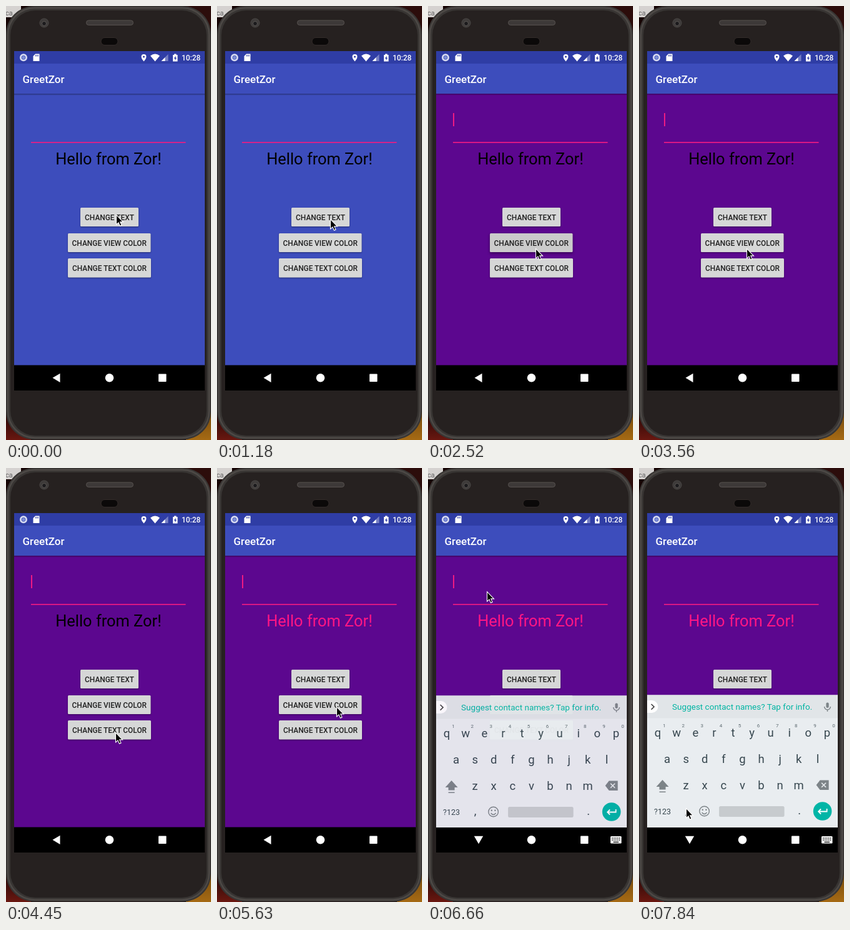
An HTML page that plays this animation: 328 by 693 pixels, repeating every 7.99 s.

```html
<!DOCTYPE html>
<html lang="en">
<head>
<meta charset="utf-8">
<title>Phone demo</title>
<style>
html, body { margin: 0; width: 100%; height: 100%; overflow: hidden; background: #160504; }
svg { display: block; width: 328px; height: 693px; font-family: Roboto, sans-serif; }
.anim { animation: 7.99s step-end infinite; }
.btn { fill: #d6d7d7; filter: drop-shadow(0 1px 1px rgba(0,0,0,.4)); }
.label { font-size: 11.9px; font-weight: 500; fill: #212121; text-anchor: middle; }
.accent { fill: #ee1b83; }
.key { font-size: 18.5px; fill: #37474f; text-anchor: middle; }
.digit { font-size: 8px; fill: #5d6a70; text-anchor: middle; }

#view { fill: #3d4dbc; animation-name: view; }
#hello { font-size: 25.4px; fill: #000; animation-name: hello; }
#caret { opacity: 0; animation-name: caret; }
#b0 { animation-name: press0; }
#b1 { animation-name: press1; }
#b2 { animation-name: press2; }
#keyboard { opacity: 0; animation-name: slide; }
#back { animation-name: back; }
#down { opacity: 0; animation-name: down; }
#pointer { animation-name: pointer; }

@keyframes view { 0% { fill: #3d4dbc } 31.53%, 100% { fill: #5c078f } }
@keyframes hello { 0% { fill: #000 } 59.32%, 100% { fill: #ff1684 } }
@keyframes caret {
  0%, 11.13%, 24.03%, 35.29%, 48.18%, 61.2%, 74.09%, 85.23%, 98.12%, 100% { opacity: 0 }
  3.75%, 16.64%, 29.66%, 40.8%, 53.81%, 66.7%, 79.72%, 90.86% { opacity: 1 }
}
@keyframes press0 {
  3.75% { filter: drop-shadow(0 2px 2px rgba(0,0,0,.5)) }
  5.63% { fill: #cbcbcb; filter: drop-shadow(0 2px 2px rgba(0,0,0,.5)) }
  9.26%, 100% { fill: #d6d7d7; filter: drop-shadow(0 1px 1px rgba(0,0,0,.4)) }
}
@keyframes press1 {
  27.78% { fill: #d6d7d7; filter: drop-shadow(0 2px 2px rgba(0,0,0,.5)) }
  31.53% { fill: #cbcbcb; filter: drop-shadow(0 2px 2px rgba(0,0,0,.4)) }
  35.29%, 100% { fill: #d6d7d7; filter: drop-shadow(0 1px 1px rgba(0,0,0,.4)) }
}
@keyframes press2 {
  57.57% { fill: #d6d7d7; filter: drop-shadow(0 2px 2px rgba(0,0,0,.5)) }
  59.32% { fill: #cbcbcb; filter: drop-shadow(0 2px 2px rgba(0,0,0,.4)) }
  63.07%, 100% { fill: #d6d7d7; filter: drop-shadow(0 1px 1px rgba(0,0,0,.4)) }
}
@keyframes slide {
  0% { opacity: 0 }
  81.47% { opacity: .4; transform: translateY(14px) }
  83.35% { opacity: .965; transform: translateY(1px) }
  85.23%, 100% { opacity: 1; transform: none }
}
@keyframes back { 0% { opacity: 1 } 81.47%, 100% { opacity: 0 } }
@keyframes down { 0% { opacity: 0 } 81.47%, 100% { opacity: 1 } }
@keyframes pointer {
  0% { transform: translate(177px, 334px) }
  14.76% { transform: translate(182px, 341px) }
  16.64% { transform: translate(194px, 362px) }
  18.52% { transform: translate(198px, 388px) }
  20.4% { transform: translate(184px, 403px) }
  22.27% { transform: translate(175px, 394px) }
  24.03% { transform: translate(173px, 388px) }
  46.3% { transform: translate(172px, 392px) }
  48.18% { transform: translate(172px, 399px) }
  50.06% { transform: translate(171px, 407px) }
  51.93% { transform: translate(171px, 412px) }
  53.81% { transform: translate(172px, 415px) }
  55.69% { transform: translate(176px, 423px) }
  66.7% { transform: translate(178px, 420px) }
  68.58% { transform: translate(184px, 405px) }
  70.46% { transform: translate(192px, 382px) }
  72.21% { transform: translate(208px, 328px) }
  74.09% { transform: translate(182px, 264px) }
  75.96% { transform: translate(136px, 220px) }
  77.84% { transform: translate(105px, 203px) }
  79.72% { transform: translate(95px, 198px) }
  90.86% { transform: translate(94px, 218px) }
  92.74% { transform: translate(89px, 310px) }
  94.49% { transform: translate(82px, 440px) }
  96.37% { transform: translate(77px, 528px) }
  98.12%, 100% { transform: translate(76px, 544px) }
}
</style>
</head>
<body>
<svg viewBox="0 0 328 693">
  <defs>
    <linearGradient id="shade" x2="0" y2="1">
      <stop stop-color="#000" stop-opacity=".35"/><stop offset="1" stop-color="#000" stop-opacity="0"/>
    </linearGradient>
    <linearGradient id="red" x2="0" y2="1">
      <stop stop-color="#160504"/><stop offset="1" stop-color="#6a1710"/>
    </linearGradient>
    <linearGradient id="amber" x2="0" y2="1">
      <stop stop-color="#6d450c"/><stop offset="1" stop-color="#a66a14"/>
    </linearGradient>
    <clipPath id="app"><rect x="13" y="140" width="305" height="433.5"/></clipPath>
  </defs>

  <!-- desktop -->
  <path d="M0 0H24V18H0Z" fill="#d5d2d0"/>
  <text x="-1" y="15" font-size="11" fill="#666">ca</text>
  <path d="M288 0H328V40H288Z" fill="#2c0d0b"/>
  <path d="M0 640H40V693H0Z" fill="url(#red)"/>
  <path d="M288 640H328V693H288Z" fill="url(#amber)"/>

  <!-- phone body -->
  <rect x="0" y="0" width="328" height="692.5" rx="45" fill="#383533"/>
  <rect x="3" y="3" width="322" height="686.5" rx="43" fill="none" stroke="#4d4946" stroke-width="2.5"/>
  <rect x="7" y="7" width="314" height="679" rx="40" fill="#262120"/>
  <circle cx="61" cy="27" r="7" fill="#3d3a39" stroke="#4b4846"/>
  <circle cx="61" cy="28" r="3.5" fill="#1b1a1c" stroke="#5c5856"/>
  <rect x="128.5" y="23" width="75" height="7.5" rx="3.7" fill="#3d3938" stroke="#57524f"/>
  <rect x="152" y="50.5" width="27" height="12" rx="6" fill="#0b0909" stroke="#332c2a"/>

  <!-- app -->
  <rect x="13" y="72" width="305" height="542"/>
  <rect id="view" class="anim" x="13" y="140" width="305" height="433.5"/>
  <rect x="13" y="72" width="305" height="68" fill="#3d4dbc"/>
  <rect x="13" y="72" width="305" height="20" fill="#2f3da5"/>
  <rect x="13" y="140" width="305" height="3" fill="url(#shade)"/>
  <text x="26.5" y="123" font-size="17" font-weight="500" fill="#fff">GreetZor</text>

  <!-- status bar -->
  <g fill="#fff">
    <circle cx="28" cy="82.3" r="6" fill="#d9dcf1"/>
    <circle cx="28" cy="82.3" r="3" fill="#8090d8" stroke="#5061bd"/>
    <path d="M47 76.5H53.5V88H43.5V80Z"/>
    <path d="M47.3 78V80.5M49.3 78V80.5M51.3 78V80.5" stroke="#2f3da5"/>
    <path d="M220.5 77a4 4 0 0 1 4 4q0 3-4 7.5q-4-4.5-4-7.5a4 4 0 0 1 4-4Z"/>
    <circle cx="220.5" cy="81" r="1.5" fill="#2f3da5"/>
    <path d="M231 79.5Q238.5 73.5 246 79.5L238.5 88.5Z"/>
    <path d="M259.5 77V88H248.5Z" opacity=".35"/>
    <path d="M254.5 82V88H248.5Z"/>
    <path d="M269 76.5H272.5V78H274.5V88.5H267V78H269Z"/>
    <path d="M271.5 79.5L268.8 84H270.5V87L273 82.8H271.5Z" fill="#2f3da5"/>
    <text x="281" y="86.7" font-size="11.9" font-weight="500">10:28</text>
  </g>

  <!-- content -->
  <rect class="accent" x="40" y="217" width="247.5" height="1.7"/>
  <rect id="caret" class="accent anim" x="40" y="171" width="2" height="21"/>
  <text id="hello" class="anim" x="79.2" y="252.7">Hello from Zor!</text>
  <rect id="b0" class="btn anim" x="119" y="322" width="93" height="30" rx="1.5"/>
  <rect id="b1" class="btn anim" x="99" y="363" width="132.5" height="30" rx="1.5"/>
  <rect id="b2" class="btn anim" x="99" y="403" width="133" height="30.5" rx="1.5"/>
  <text class="label" x="165.5" y="341.7">CHANGE TEXT</text>
  <text class="label" x="165.3" y="382.8">CHANGE VIEW COLOR</text>
  <text class="label" x="165.5" y="422.9">CHANGE TEXT COLOR</text>

  <!-- keyboard -->
  <g clip-path="url(#app)">
    <g id="keyboard" class="anim">
      <rect x="13" y="362.5" width="305" height="212" fill="#e9edf0"/>
      <rect x="13" y="362.5" width="305" height="37" fill="#e1e5e8"/>
      <path d="M13 371H20.5a10 10 0 0 1 0 20H13Z" fill="#fff"/>
      <g transform="translate(.6)">
        <path d="M19 377L23.5 381.3L19 385.6" fill="none" stroke="#444" stroke-width="1.6"/>
        <text x="52.5" y="386.2" font-size="13.5" fill="#00b5a3">Suggest contact names? Tap for info.</text>
        <g stroke="#7d8488" fill="none" stroke-width="1.4">
          <rect x="298.8" y="374.5" width="4.3" height="8.5" rx="2.1" fill="#7d8488" stroke="none"/>
          <path d="M296 381a4.900 4.900 0 0 0 9.800 0M300.900 386V389"/>
          <circle cx="104" cy="548" r="7.8"/>
          <path d="M100 550q4 5 8 0"/>
        </g>
        <g fill="#7d8488">
          <path d="M37 498L47 509H42V513.500H32V509H27ZM32 516.500H42V518H32Z"/>
          <path d="M289 498.500H303V514H289L283 506.200Z"/>
          <path d="M291.500 502.700L298.500 509.700M298.500 502.700L291.500 509.700" stroke="#e9edf0" stroke-width="1.6"/>
          <circle cx="101.200" cy="545.800" r="1.200"/><circle cx="106.800" cy="545.800" r="1.200"/>
        </g>
        <g id="keys"></g>
        <text class="key" x="37" y="552.500" style="font-size:12.5px">?123</text>
        <text class="key" x="75" y="553">,</text>
        <text class="key" x="256" y="553">.</text>
        <rect x="127.500" y="540" width="104.500" height="17" rx="2.500" fill="#c7cbce"/>
        <circle cx="293" cy="548" r="14.800" fill="#00b5a6"/>
        <path d="M300 544V548.500H287M290.500 544.500L286.500 548.500L290.500 552.500" fill="none" stroke="#fff" stroke-width="1.8"/>
      </g>
    </g>
  </g>

  <!-- navigation bar -->
  <g fill="#fff">
    <path id="back" class="anim" d="M74.500 593.800L86.500 586.700V601Z"/>
    <g id="down" class="anim">
      <path d="M73.800 587.700H88.200L81 600.200Z"/>
      <rect x="292" y="588" width="17.500" height="11.500" rx="1.200"/>
      <path d="M294 591H308M294 594H308" stroke="#000" stroke-width="1.5" stroke-dasharray="1.6 1.3"/>
      <path d="M296.500 597.300H305" stroke="#000" stroke-width="1.3"/>
    </g>
    <circle cx="165.500" cy="593.700" r="6.800"/>
    <rect x="244" y="587.500" width="12.500" height="12.500" rx=".8"/>
  </g>

  <g id="pointer" class="anim">
    <path d="M-.5-.5V15L3 11.800L5.400 17.200L8 16.100L5.700 10.900H10.500Z" stroke="#fff" stroke-width="1.1"/>
  </g>
</svg>
<script>
const keys = document.getElementById('keys');

function put(cls, text, x, y) {
  const el = document.createElementNS('http://www.w3.org/2000/svg', 'text');
  el.setAttribute('class', cls);
  el.setAttribute('x', x);
  el.setAttribute('y', y);
  el.textContent = text;
  keys.append(el);
}

function row(cls, chars, x, y) {
  [...chars].forEach((c, i) => put(cls, c, x + i * 30.1, y));
}

row('key', 'qwertyuiop', 29.5, 429);
row('digit', '1234567890', 40, 414);
row('key', 'asdfghjkl', 44.5, 471);
row('key', 'zxcvbnm', 74.5, 513);
</script>
</body>
</html>
```
